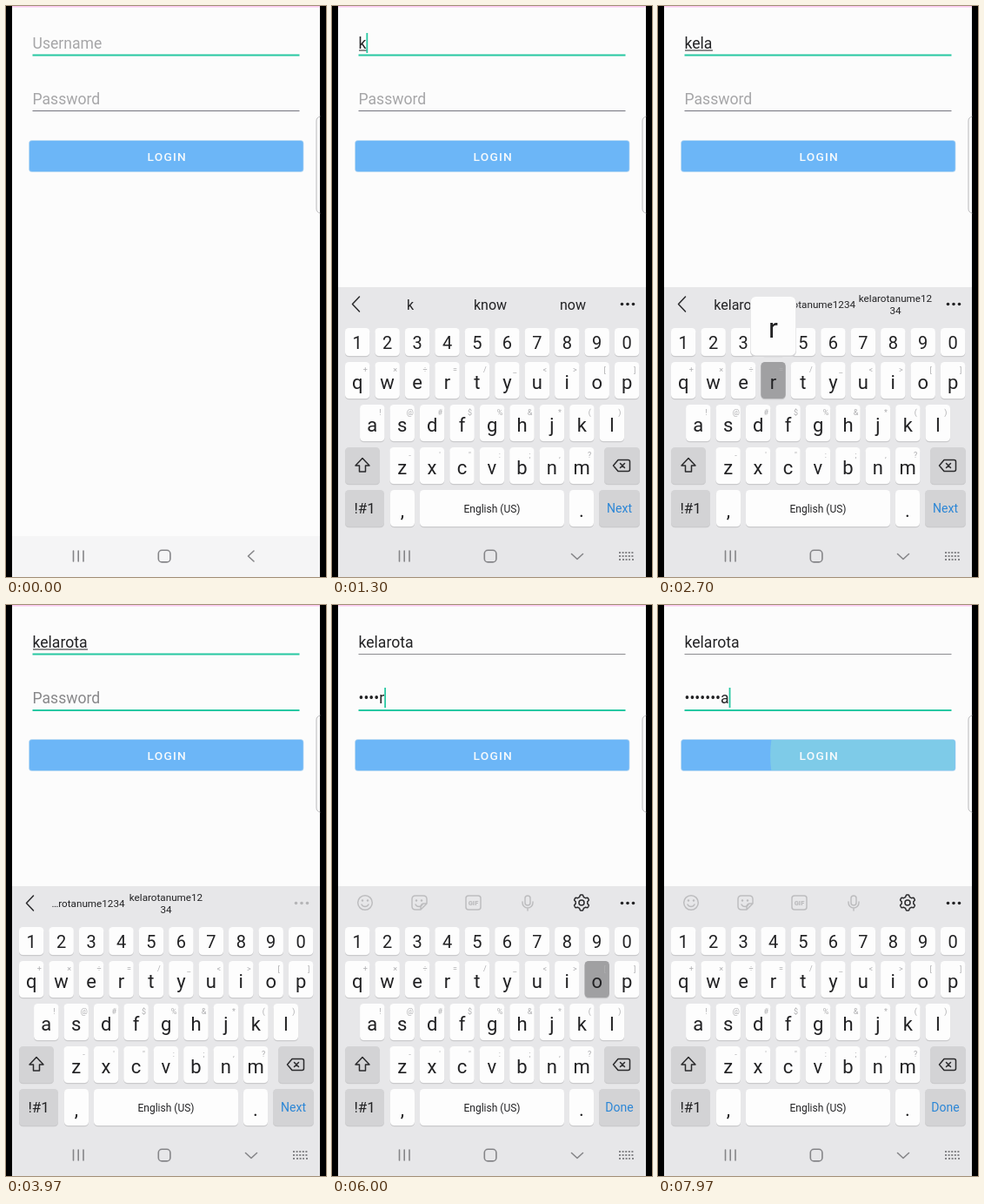
These frames come from a looping animation (368x656 px, 8000 ms). An HTML page:

```html
<!DOCTYPE html>
<html lang="en">
<head>
<meta charset="utf-8">
<title>Login</title>
<style>
html, body { margin: 0; width: 100%; height: 100%; overflow: hidden; background: #000; }
svg { display: block; width: 100%; height: 100%; }
text { font-family: Roboto, "Noto Sans", sans-serif; fill: #222224; }
.mid { text-anchor: middle; }
.line { fill: none; stroke: #2a2a2c; stroke-width: 1.5; stroke-linecap: round; stroke-linejoin: round; }
.nav { fill: none; stroke: #858588; stroke-width: 1.6; stroke-linecap: round; stroke-linejoin: round; }
</style>
</head>
<body>
<svg id="stage" viewBox="0 0 368 656" preserveAspectRatio="none"></svg>
<script>
const LOOP = 8000;
const NAME = 'kelarota';
const TEAL = '#27c8a2', DARK = '#74747e', INK = '#222224', HINT = '#a6a6a8';
const PAGE = '#fcfcfc', NAV = '#f5f5f6', BOARD = '#e7e7e9';
const KEY = '#fdfdfd', SPECIAL = '#d3d3d5', PRESSED = '#a0a0a2';

// Key press times; a letter is committed HOLD ms later.
const HOLD = 100;
const userTimes = [1050, 1310, 1600, 1830, 2660, 2890, 3110, 3320];
const passTimes = [4500, 4780, 5040, 5300, 5600, 5930, 6160, 6390];
const TAP = 60, SLIDE = 150, SLIDE_LEN = 260;
const NEXT_DOWN = 3840, NEXT_UP = 3940, PASS_MODE = 4060, LOGIN_DOWN = 7830;

const esc = s => s.replace(/&/g, '&amp;').replace(/</g, '&lt;');
const text = (x, y, size, s, attrs = 'class="mid"') =>
  `<text x="${x}" y="${y}" font-size="${size}" ${attrs}>${esc(s)}</text>`;
const rect = (x, y, w, h, fill, attrs = '') =>
  `<rect x="${x}" y="${y}" width="${w}" height="${h}" fill="${fill}" ${attrs}/>`;
const path = (d, cls = 'line', attrs = '') => `<path d="${d}" class="${cls}" ${attrs}/>`;

const keyPos = {};
function key(id, x, y, w, h, fill, label = '') {
  keyPos[id] = { cx: x + w / 2, top: y, fill };
  return rect(x, y + 1.2, w, h, '#cacacc', 'rx="4.5"') +
    rect(x, y, w, h, fill, `rx="4.5" id="key-${id}"`) + label;
}

function keyRow(chars, hints, cx, y) {
  return [...chars].map((c, i) => {
    const x = cx + i * 34.44;
    return key(c, x - 14.2, y, 28.4, 42, KEY,
      text(x, y + 31, 22, c) +
      text(x + 9, y + 12, 9, hints[i], 'class="mid" style="fill:#aeaeb0"'));
  }).join('');
}

function digitRow() {
  return [...'1234567890'].map((c, i) => {
    const x = 29.2 + i * 34.44;
    return key(c, x - 14.2, 370, 28.4, 32, KEY, text(x, 394, 20, c));
  }).join('');
}

function dots(id) {
  return `<g id="${id}" fill="${INK}">` +
    [333.5, 340, 346.5].map(x => `<circle cx="${x}" cy="342.5" r="1.8"/>`).join('') + '</g>';
}

function gear(cx, cy) {
  const pts = Array.from({ length: 72 }, (_, i) => {
    const a = i * Math.PI / 36, r = 7.9 + 1.1 * Math.tanh(3 * Math.cos(6 * a));
    return (cx + r * Math.sin(a)).toFixed(1) + ' ' + (cy - r * Math.cos(a)).toFixed(1);
  });
  return path('M' + pts.join('L') + 'Z') + `<circle cx="${cx}" cy="${cy}" r="3" class="line"/>`;
}

function toolbar() {
  const face = x => path(`M${x - 4} 344a4.4 4.4 0 0 0 8 0`) +
    [-3, 3].map(d => `<circle cx="${x + d}" cy="339.5" r="1.2" fill="${INK}"/>`).join('');
  return `<g id="tools"><g id="media">
    <circle cx="38" cy="342" r="8.3" class="line"/>${face(38)}
    ${path('M96 334h9q4 0 4 4v5l-7 7h-6q-4 0-4-4v-8q0-4 4-4zM109 343h-3q-4 0-4 4v3')}${face(100)}
    ${rect(154, 334, 17, 16, 'none', 'rx="3" class="line"')}
    ${text(162.5, 345, 7.5, 'GIF', 'class="mid" font-weight="900"')}
    ${rect(222, 334, 6, 11, 'none', 'rx="3" class="line"')}
    ${path('M219 341v1a6 6 0 0 0 12 0v-1M225 348v3')}
    </g>${gear(287, 342)}${dots('toolDots')}</g>`;
}

function keyboard() {
  return rect(7, 323, 354, 334, BOARD) + toolbar() +
    `<g id="suggest">${path('M31.5 334l-8 8.5l8 8.5')}<g id="words"></g>${dots('wordDots')}</g>` +
    digitRow() +
    keyRow('qwertyuiop', '+×÷=/_<>[]', 29.2, 409) +
    keyRow('asdfghjkl', '!@#$%&*()', 46.3, 458) +
    keyRow('zxcvbnm', '-\'":;,?', 80.6, 507) +
    key('shift', 15, 507, 40, 42, SPECIAL,
      path('M35 519.5l8 8.5h-4.5v7h-7v-7H27z')) +
    key('del', 313, 507, 41, 42, SPECIAL,
      path('M329 521.5h11.5q2 0 2 2v9q0 2-2 2H329l-5.5-6.5zM331.5 525.5l5 5m0-5l-5 5')) +
    key('sym', 15, 556, 45, 42, SPECIAL, text(37.7, 583, 17, '!#1')) +
    key('comma', 67, 556, 28, 42, KEY, text(81, 587, 22, ',')) +
    key('space', 101, 556, 166, 42, KEY, text(184, 581.5, 12, 'English (US)')) +
    key('dot', 273, 556, 28, 42, KEY, text(287, 587, 22, '.')) +
    key('enter', 307, 556, 47, 42, SPECIAL,
      text(330.5, 582, 14, 'Next', 'class="mid" id="enterText" style="fill:#2b86d6"'));
}

const stage = document.getElementById('stage');
stage.innerHTML = `
  <defs>
    <clipPath id="board"><rect x="7" y="190" width="354" height="419"/></clipPath>
    <clipPath id="btn"><rect x="27" y="155" width="314.5" height="35" rx="3"/></clipPath>
  </defs>
  ${rect(0, 0, 368, 656, '#000')}
  ${rect(7, 0, 354, 656, PAGE)}
  ${rect(7, 0, 354, 1.5, '#fbc8f0')}
  ${text(30.5, 49, 17.6, '', 'id="user"')}
  ${rect(31, 50.5, 0, 1, INK, 'id="compose"')}
  ${rect(30.5, 55.5, 307, 2, TEAL, 'id="userLine"')}
  ${text(30.5, 113, 17.6, '', 'id="pass"')}
  ${rect(30.5, 120, 307, 1, DARK, 'id="passLine"')}
  ${rect(0, 0, 1.8, 23, TEAL, 'id="caret"')}
  ${rect(26.3, 154.2, 316, 36.6, '#a3cff2', 'rx="3.5"')}
  ${rect(27, 155, 314.5, 35, '#6cb6f7', 'rx="3"')}
  <circle id="ripple" cx="255" cy="173" r="0" fill="#7ecbe8" clip-path="url(#btn)"/>
  ${text(185.3, 178, 13.7, 'LOGIN', 'class="mid" font-weight="500" letter-spacing="1.25" style="fill:#f6fafc"')}
  ${path('M361 127q-4 1-4 5v101q0 4 4 5', 'line', 'style="stroke:#b8b8ba;stroke-width:1"')}
  <g clip-path="url(#board)"><g id="kb">${keyboard()}</g></g>
  ${rect(7, 609, 354, 47, NAV, 'id="navBar"')}
  ${path('M77.5 626v12M83.2 626v12M89 626v12', 'nav')}
  ${rect(175.3, 625.3, 13.6, 13.6, 'none', 'rx="4" class="nav"')}
  ${path('M285 626l-6.5 6l6.5 6', 'nav', 'id="back"')}
  <g id="down">${path('M275.5 629.5l6.5 6l6.5-6', 'nav')}
    ${path('M330 628h17M330 632h17M330 636h2M334 636h9M345 636h2', 'nav', 'stroke-dasharray="2 1.6" style="stroke-linecap:butt;stroke-width:2"')}</g>
  <g id="popup">
    ${rect(-26.5, 1, 53, 68, '#d4d4d6', 'rx="6"')}${rect(-26, 0, 52, 67.5, KEY, 'rx="6"')}
    ${text(0, 47, 32, '', 'class="mid" id="popText"')}
  </g>`;

const el = {};
stage.querySelectorAll('[id]').forEach(n => el[n.id] = n);
const set = (id, attrs) => { for (const k in attrs) el[id].setAttribute(k, attrs[k]); };
const show = (id, on) => { el[id].style.display = on ? '' : 'none'; };
const write = (id, s) => { if (el[id].textContent !== s) el[id].textContent = s; };

const faded = (x, s) => `<text x="${x}" y="349" font-size="16" class="mid">${s.slice(0, -1)}` +
  `<tspan fill-opacity=".4">${s.slice(-1)}</tspan></text>`;
const plain = (x, s) => text(x, 349, 16, s);
const twoLines = x => text(x, 340, 11.7, NAME + 'nume12') + text(x, 354, 11.7, '34');
const tail = x => text(x, 347, 11.7, '…' + NAME.slice(4) + 'nume1234');

function suggestions(n) {
  if (n === 1) return plain(90, 'k') + plain(182, 'know') + plain(277, 'now');
  if (n === 2) return plain(90, 'ke') + plain(182, 'key') + plain(277, 'keep');
  if (n === 3) return faded(90, 'kelar') + faded(182, 'nic') + faded(277, 'now');
  if (n < 8) return plain(93, NAME) + tail(185) + twoLines(273);
  return tail(94.5) + twoLines(184);
}

let lastWords = -1, lastKey = null;
function pressKey(id) {
  if (id === lastKey) return;
  if (lastKey) set('key-' + lastKey, { fill: keyPos[lastKey].fill });
  if (id) set('key-' + id, { fill: PRESSED });
  lastKey = id;
}

function draw(t) {
  const typed = times => times.filter(p => t >= p + HOLD).length;
  const held = times => times.findIndex(p => t >= p && t < p + HOLD);
  const nUser = typed(userTimes), nPass = typed(passTimes);
  const passMode = t >= PASS_MODE, moving = t >= NEXT_UP;

  // Fields
  write('user', nUser ? NAME.slice(0, nUser) : 'Username');
  el.user.style.fill = nUser ? INK : HINT;
  write('pass', nPass ? '•'.repeat(nPass - 1) + NAME[nPass - 1] : 'Password');
  el.pass.style.fill = nPass ? INK : moving ? '#88888a' : HINT;
  const userW = nUser ? el.user.getComputedTextLength() : 0;
  const passW = nPass ? el.pass.getComputedTextLength() : 0;
  set('compose', { width: passMode ? 0 : userW });
  set('userLine', passMode ? { y: 56, height: 1, fill: '#8c8c90' } : { y: 55.5, height: 2, fill: TEAL });
  set('passLine', moving ? { y: 120, height: 2, fill: TEAL } : { y: 120, height: 1, fill: DARK });

  // Caret blinks from the latest edit
  const edits = [TAP, ...userTimes.map(p => p + HOLD), PASS_MODE, ...passTimes.map(p => p + HOLD)];
  const since = t - edits.filter(e => e <= t).pop();
  const caretOn = since >= 0 && since % 1000 < 500 && !(moving && !passMode);
  show('caret', caretOn);
  set('caret', { x: 30.5 + (passMode ? passW : userW), y: passMode ? 95 : 31 });

  // Keyboard slides in
  const p = Math.min(1, Math.max(0, (t - SLIDE) / SLIDE_LEN));
  set('kb', { transform: `translate(0 ${(286 * Math.pow(1 - p, 3)).toFixed(2)})` });
  show('kb', p > 0);
  set('navBar', { fill: p > 0 ? BOARD : NAV });
  show('back', p === 0);
  show('down', p > 0);

  // Top strip
  const words = nUser > 0 && !passMode;
  show('suggest', words);
  show('tools', !words);
  set('media', { opacity: passMode ? .22 : 1 });
  set('wordDots', { opacity: moving ? .25 : 1 });
  if (words && nUser !== lastWords) {
    el.words.innerHTML = suggestions(nUser);
    lastWords = nUser;
  }
  write('enterText', passMode ? 'Done' : 'Next');

  // Pressed keys; no preview while a password is entered
  const u = held(userTimes), w = held(passTimes);
  pressKey(u >= 0 ? NAME[u] : w >= 0 ? NAME[w] : t >= NEXT_DOWN && t < NEXT_UP ? 'enter' : null);
  show('popup', u >= 0);
  if (u >= 0) {
    const k = keyPos[NAME[u]];
    set('popup', { transform: `translate(${k.cx} ${k.top - 75})` });
    write('popText', NAME[u]);
  }

  // Button ripple
  set('ripple', { r: t < LOGIN_DOWN ? 0 : 30 + (t - LOGIN_DOWN) * .68 });
}

const start = performance.now();
function tick() {
  draw((performance.now() - start) % LOOP);
  requestAnimationFrame(tick);
}
tick();
</script>
</body>
</html>
```
